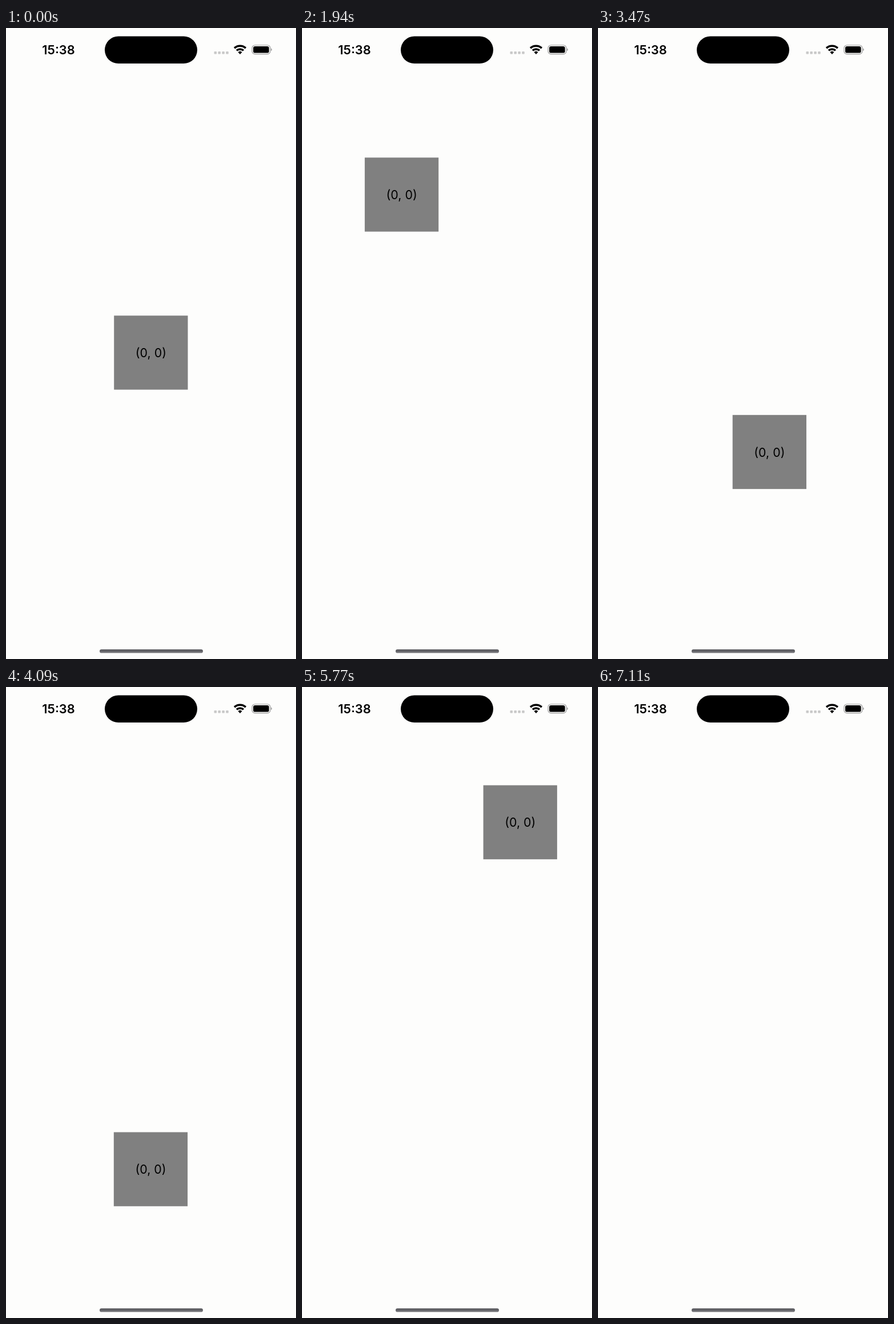
Recreate the animation shown at these times as an HTML page. Size 508 by 1102 pixels, loop 7.13 s.

```html
<!DOCTYPE html>
<html lang="en">
<head>
<meta charset="utf-8">
<title>Draggable square</title>
<style>
html, body { margin: 0; width: 100%; height: 100%; overflow: hidden; background: #fdfdfc; }
svg { display: block; width: 100vw; height: 100vh; }
text { font-family: Inter, sans-serif; fill: #000; text-anchor: middle; }
</style>
</head>
<body>
<svg viewBox="0 0 508 1102">
  <defs>
    <clipPath id="safe"><rect y="76.3" width="508" height="982"/></clipPath>
    <linearGradient id="bar" x2="0" y2="1">
      <stop offset="0" stop-color="#505055"/>
      <stop offset="1" stop-color="#7c7c80"/>
    </linearGradient>
  </defs>
  <rect width="508" height="1102" fill="#fdfdfc"/>

  <g clip-path="url(#safe)">
    <g id="square">
      <rect width="129.3" height="129.3" fill="#808080"/>
      <text x="64.7" y="72.9" font-size="21.4">(0, 0)</text>
    </g>
  </g>

  <text x="92" y="45.8" font-size="21.8" font-weight="600">15:38</text>
  <rect x="173" y="14.5" width="162" height="47.6" rx="23.8"/>
  <g fill="#c9c9c9">
    <rect x="364.5" y="41" width="4.6" height="4.6" rx="1"/>
    <rect x="371.4" y="41" width="4.6" height="4.6" rx="1"/>
    <rect x="378.3" y="41" width="4.6" height="4.6" rx="1"/>
    <rect x="385.2" y="41" width="4.6" height="4.6" rx="1"/>
  </g>
  <g id="wifi" fill="none" stroke="#000"></g>
  <rect x="431.1" y="30" width="31.8" height="15.6" rx="4.9" fill="none" stroke="#999" stroke-width="1.2"/>
  <rect x="433.1" y="32" width="27.6" height="11.6" rx="3.2"/>
  <path d="M464.2 35.3q1.7 .6 1.7 2.5t-1.7 2.5z" fill="#999"/>
  <rect x="164" y="1085.3" width="181" height="6.3" rx="3.1" fill="url(#bar)"/>
</svg>
<script>
const LOOP = 7130;

// time, left, top of the square
const path = [
  [760, 189.2, 502.3], [1940, 109.9, 226.3], [2910, 262.4, 504],
  [3550, 229.5, 705], [3750, 196, 800], [3930, 176, 796],
  [4090, 188.8, 777.5], [4310, 196, 738], [4830, 208.4, 590.2],
  [5050, 233, 496], [5770, 317.6, 171.6], [5810, 322.5, 152.5],
  [6550, 361, 2.7], [7110, 374.7, -54]
];
// brief stalls in the drag
const stalls = [3550, 4310, 5050, 5810, 6550];
const stallTime = 100;

const square = document.getElementById("square");

function slope(i, k) {
  if (i === 0) return 0;
  const a = path[i - 1], b = path[i], c = path[i + 1];
  const before = (b[k] - a[k]) / (b[0] - a[0]);
  if (!c) return before;
  const after = (c[k] - b[k]) / (c[0] - b[0]);
  if (before * after <= 0) return 0;
  return 2 * before * after / (before + after);
}

function at(t, k) {
  const last = path.length - 1;
  if (t <= path[0][0]) return path[0][k];
  if (t >= path[last][0]) return path[last][k];
  let i = 0;
  while (t >= path[i + 1][0]) i++;
  const a = path[i], b = path[i + 1], span = b[0] - a[0];
  const u = (t - a[0]) / span, v = 1 - u;
  return v * v * (1 + 2 * u) * a[k] + u * u * (3 - 2 * u) * b[k]
    + span * u * v * (v * slope(i, k) - u * slope(i + 1, k));
}

function render(t) {
  const stall = stalls.find(s => t >= s && t < s + stallTime);
  const time = stall === undefined ? t : stall;
  square.setAttribute("transform",
    `translate(${at(time, 1).toFixed(2)} ${at(time, 2).toFixed(2)})`);
}

function arc(r, width) {
  const dx = r * Math.sin(0.74), y = 46 - r * Math.cos(0.74);
  return `<path d="M${410 - dx} ${y}A${r} ${r} 0 0 1 ${410 + dx} ${y}" stroke-width="${width}"/>`;
}
document.getElementById("wifi").innerHTML =
  arc(14.7, 3.5) + arc(9, 3.4) + arc(2.6, 5.2);

let start;
function tick(now) {
  if (start === undefined) start = now;
  render((now - start) % LOOP);
  requestAnimationFrame(tick);
}
render(0);
requestAnimationFrame(tick);
</script>
</body>
</html>
```
